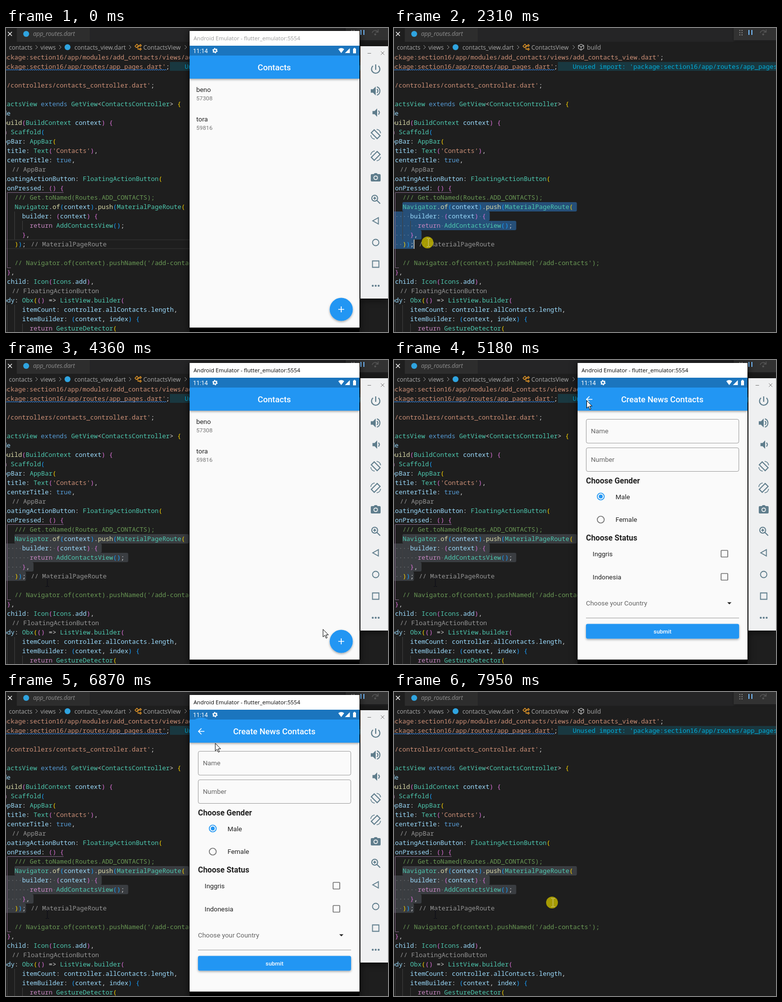
An HTML page that plays this animation: 776x618 px, repeating every 7.99 s.

```html
<!DOCTYPE html>
<html lang="en">
<head>
<meta charset="utf-8">
<title>Contacts app demo</title>
<style>
html, body { margin: 0; width: 100%; height: 100%; overflow: hidden; background: #1e1e1e; }
svg { display: block; }
text { white-space: pre; }
.code { font: 12.83px "Noto Sans Mono", monospace; }
.ui { font: 12.15px "Open Sans", sans-serif; fill: #a9a9a9; }
.app { font: 13.4px Roboto, sans-serif; fill: #000000de; }
.app .bar { font-size: 16.77px; font-weight: 500; fill: #fff; text-anchor: middle; }
.app .sub { font-size: 11.74px; fill: #0000008a; }
.app .head { font-size: 15.9px; font-weight: 700; }
.app .hint { fill: #0009; }
.line { fill: none; }
</style>
</head>
<body>
<svg id="stage" width="776" height="618" viewBox="0 0 776 618">
  <defs>
    <clipPath id="screen"><path d="M373 36H718V609H373z"/></clipPath>
    <clipPath id="status"><path d="M373 36H718V56H373z"/></clipPath>
    <filter id="soft" x="-30%" y="-30%" width="160%" height="180%">
      <feDropShadow dx="0" dy="2" stdDeviation="2" flood-opacity=".35"/>
    </filter>
    <path id="ibeam" class="line" d="M-3.5-8.5H-1L0-7.5 1-8.5H3.5M0-7.5V7.5M-3.5 8.5H-1L0 7.5 1 8.5H3.5"/>
    <g id="chev"><path class="line" stroke="#a0a0a0" d="M-2-4 2 0-2 4"/></g>
  </defs>

  <!-- editor -->
  <rect width="776" height="618" fill="#1e1e1e"/>
  <rect width="776" height="28" fill="#252526"/>
  <rect width="22" height="28" fill="#1e1e1e"/>
  <rect x="22" width="148" height="28" fill="#2d2d2d"/>
  <path d="M4 8l8 8M12 8l-8 8" stroke="#fff" stroke-width="1.3"/>
  <g fill="#2fa4e0"><circle cx="41" cy="12" r="6"/><circle cx="125" cy="39" r="6"/></g>
  <g class="ui">
    <text x="55" y="16" font-style="italic" fill="#8f8f8f">app_routes.dart</text>
    <text x="6" y="44">contacts</text>
    <text x="70" y="44">views</text>
    <text x="139" y="44">contacts_view.dart</text>
    <text x="279" y="44">ContactsView</text>
    <text x="392" y="44">build</text>
  </g>
  <use href="#chev" x="62" y="39"/><use href="#chev" x="110" y="39"/>
  <use href="#chev" x="252" y="39"/><use href="#chev" x="365" y="39"/>
  <path class="line" stroke="#ee9d28" stroke-width="1.3" d="M262 37l4-4 3 3-4 4zM268 37h3M268 37v6h3M271 35.500l2-2 2 2-2 2zM271 43l2-2 2 2-2 2z"/>
  <path class="line" stroke="#c5c5c5" stroke-width="1.1" d="M380 33l5.500 2.500v6L380 45l-5.500-3.500v-6zM374.500 35.500L380 38.500l5.500-3M380 38.500V45"/>
  <rect x="333" y="69" width="443" height="18" fill="#00b7e4" opacity=".17"/>
  <path id="current" class="line" stroke="#2d2d2d" stroke-width="1.500" d="M-2 430.500H778M-2 448.500H778"/>
  <g id="selection"></g>
  <path class="line" stroke="#404040" d="M17.500 373V430M33.500 392V411M2.500 563V618M17.500 563V618M33.500 601V618"/>
  <path class="line" stroke="#806584" d="M117 334.500H2.500V487.500H10"/>
  <g id="code" class="code"></g>
  <path id="wave" class="line" stroke="#3794ff"/>
  <rect id="caret" y="430" width="1.500" height="19" fill="#d8d8d0"/>
  <use id="trace" href="#ibeam" x="84" y="452" stroke="#090914"/>
  <g>
    <rect x="690" y="-2" width="90" height="27" fill="#333" filter="url(#soft)"/>
    <path stroke="#8a8a8a" stroke-width="2" stroke-dasharray="2 2.500" d="M702.500 4v12M707 4v12"/>
    <path stroke="#75beff" stroke-width="2" d="M721 4v10M727 4v10"/>
    <path class="line" stroke="#565656" stroke-width="1.500" d="M744 10a6 6 0 0 1 11-2M756 3v5.500h-5.500"/>
    <circle cx="750" cy="13" r="2" fill="#565656"/>
  </g>

  <!-- emulator -->
  <g id="emulator">
    <g style="filter:drop-shadow(0 1px 8px #000b)">
      <path fill="#fff" d="M373 6H718V618H373z"/><path fill="#eff0f1" d="M720 37H776V550H720z"/>
    </g>
    <text id="caption" class="ui" x="381" y="25" style="font-size:11.26px">Android Emulator - flutter_emulator:5554</text>
    <rect x="373" y="609" width="345" height="9"/>
    <g class="app" clip-path="url(#screen)">
      <rect x="373" y="36" width="345" height="573" fill="#fafafa"/>
      <rect x="373" y="36" width="345" height="67" fill="#2196f3" filter="url(#soft)"/>
      <text class="bar" x="545" y="86">Contacts</text>
      <text x="386.500" y="130">beno</text><text class="sub" x="386.500" y="147">57308</text>
      <text x="386.500" y="190">tora</text><text class="sub" x="386.500" y="207">59816</text>
      <circle cx="681" cy="572" r="23.500" fill="#2196f3" filter="url(#soft)"/>
      <circle id="tap" cx="681" cy="572" fill="#fff" opacity=".22"/>
      <path stroke="#fff" stroke-width="1.700" d="M675 572h12M681 566v12"/>

      <g id="page">
        <rect x="373" y="36" width="345" height="573" fill="#fafafa"/>
        <rect x="373" y="36" width="345" height="67" fill="#2196f3" filter="url(#soft)"/>
        <circle id="backTap" cx="397" cy="80" fill="#fff"/>
        <path class="line" stroke="#fff" stroke-width="1.600" d="M403 80H391.500M397 74l-6 6 6 6"/>
        <text class="bar" x="545" y="86">Create News Contacts</text>
        <g class="line" stroke="#00000061">
          <rect x="390.500" y="120.500" width="310" height="48.500" rx="3.400"/>
          <rect x="390.500" y="178.500" width="310" height="48" rx="3.400"/>
          <path d="M390 524.500H701"/>
        </g>
        <text class="hint" x="400" y="149">Name</text>
        <text class="hint" x="400" y="206.500">Number</text>
        <text class="head" x="390" y="250.500">Choose Gender</text>
        <text x="450" y="282.500">Male</text><text x="450" y="329">Female</text>
        <text class="head" x="390" y="367">Choose Status</text>
        <text x="403.500" y="398.500">Inggris</text><text x="403.500" y="445.500">Indonesia</text>
        <text class="hint" x="390" y="499">Choose your Country</text>
        <circle cx="420" cy="277.500" r="4" fill="#2196f3"/>
        <g class="line" stroke="#0000008a" stroke-width="1.700">
          <circle cx="420" cy="277.500" r="7" stroke="#2196f3"/>
          <circle cx="420" cy="324.500" r="7"/>
          <rect x="664.500" y="387" width="13.500" height="13.500" rx="1"/>
          <rect x="664.500" y="434" width="13.500" height="13.500" rx="1"/>
        </g>
        <path d="M677 492.500h8.500l-4.250 4.300z" fill="#222"/>
        <rect x="390" y="536.500" width="311" height="30" rx="3.400" fill="#2196f3" filter="url(#soft)"/>
        <text class="bar" x="545.500" y="555.500" style="font-size:11.74px">submit</text>
      </g>
      <rect x="373" y="36" width="345" height="20" opacity=".25"/>
      <circle id="arc" cx="397" cy="80" r="27.500" fill="#2196f3" clip-path="url(#status)"/>
      <text x="380" y="50.500" style="font-size:12px;fill:#fff">11:14</text>
      <g fill="#fff">
        <circle class="line" cx="424.500" cy="46" r="3" stroke="#fff" stroke-width="2.200"/>
        <circle class="line" cx="424.500" cy="46" r="4.600" stroke="#fff" stroke-width="1.600" stroke-dasharray="2.400 2.417"/>
        <path d="M675 43q6-4.500 12 0l-6 8zM698.500 41v10h-10zM705 42h1.500v-1.500h3V42h1.500v9.500h-6z"/>
      </g>
    </g>
    <g id="tools" fill="#5f7d8c"></g>
  </g>

  <g id="pointer">
    <circle id="press" cx="-2" r="12" fill="#b5a800" opacity=".9"/>
    <use id="beam" href="#ibeam"/>
    <path id="arrow" fill="#fff" stroke="#000" d="M.5.500v15.500l3.600-3.400 2.600 6 2.300-1-2.600-5.800h5z"/>
  </g>
</svg>
<script>
const $ = id => document.getElementById(id);
const show = (id, on) => $(id).style.display = on ? '' : 'none';
const clamp = (v, a = 0, b = 1) => Math.min(b, Math.max(a, v));
const LOOP = 7990, CHAR = 7.698, ROW = 19;

const colors = {
  s: '#ce9178', f: '#dcdcaa', t: '#4ec9b0', v: '#9cdcfe', k: '#569cd6', r: '#c586c0',
  c: '#6a9955', p: '#d4d4d4', y: '#ffd700', o: '#da70d6', u: '#179fff', g: '#969696', e: '#00aedb'
};
// [row, x, text]; "~" plus a letter switches the colour
const code = [
  [0, -75.4, "~kimport ~s'package:section16/app/modules/add_contacts/views/add_contacts_view.dart'~p;"],
  [1, -75.4, "~kimport ~s'package:section16/app/routes/app_pages.dart'~p;"],
  [1, 363, "~eUnused import: 'package:section16/app/routes/app_pages.dart'."],
  [3, -75.4, "~kimport ~s'../controllers/contacts_controller.dart'~p;"],
  [5, -75.4, "~kclass ~tContactsView ~kextends ~tGetView~p&lt;~tContactsController~p> ~y{"],
  [6, -60, "~v@override"],
  [7, -60, "~tWidget ~fbuild~o(~tBuildContext ~vcontext~o) {"],
  [8, -44.4, "~rreturn ~tScaffold~u("],
  [9, -13.4, "~vappBar~p: ~tAppBar~y("],
  [10, 2, "~vtitle~p: ~tText~o(~s'Contacts'~o)~p,"],
  [11, 2, "~vcenterTitle~p: ~ktrue~p,"],
  [12, 12, "~g// AppBar"],
  [13, -13.4, "~vfloatingActionButton~p: ~tFloatingActionButton~y("],
  [14, 2, "~vonPressed~p: ~o() {"],
  [15, 17.4, "~c/// Get.toNamed(Routes.ADD_CONTACTS);"],
  [16, 17.4, "~tNavigator~p.~fof~u(~vcontext~u)~p.~fpush~u(~tMaterialPageRoute~y("],
  [17, 32.8, "~vbuilder~p: ~o(~vcontext~o) {"],
  [18, 48.2, "~rreturn ~tAddContactsView~u()~p;"],
  [19, 32.8, "~o}~p,"],
  [20, 17.4, "~y)~u)~p;"],
  [20, 50.5, "~g// MaterialPageRoute"],
  [22, 17.4, "~c// Navigator.of(context).pushNamed('/add-contacts');"],
  [23, 2, "~o}~p,"],
  [24, 2, "~vchild~p: ~tIcon~o(~tIcons~p.~vadd~o)~p,"],
  [25, 12, "~g// FloatingActionButton"],
  [26, -13.4, "~vbody~p: ~tObx~y(~o() ~p=> ~tListView~p.~tbuilder~o("],
  [27, 32.8, "~vitemCount~p: ~vcontroller~p.~vallContacts~p.~vlength~p,"],
  [28, 32.8, "~vitemBuilder~p: ~u(~vcontext~p, ~vindex~u) {"],
  [29, 48.2, "~rreturn ~tGestureDetector~y("]
];
const span = part => `<tspan fill="${colors[part[0]]}">${part.slice(1)}</tspan>`;
$('code').innerHTML = code.map(([row, x, s]) =>
  `<text x="${x}" y="${64 + ROW * row}">${s.split('~').slice(1).map(span).join('')}</text>`).join('');
$('wave').setAttribute('d', 'M-2 86' + 'l2-2 2 2'.repeat(82));

// selected rows, with a dot for every space
const picked = code.filter(([row, , s]) => row > 15 && row < 21 && s[1] != 'g').map(([row, x, s], i) => {
  const text = s.replace(/~./g, ''), pad = [0, 2, 4, 2, 0][i] + (i ? 2 : 0);
  const dots = (' '.repeat(pad) + text).replace(/[^ ]/g, '_').replace(/ /g, '·').replace(/_/g, ' ');
  return { row, x, dots, from: i ? -4 : 17, to: x + text.length * CHAR, dotX: x - pad * CHAR };
});
$('selection').innerHTML = picked.map(p =>
  `<g><rect x="${p.from}" y="${50 + ROW * p.row}" height="${ROW}" rx="3"/>
   <text class="code" x="${p.dotX}" y="${64 + ROW * p.row}" fill="#ffffff48">${p.dots}</text></g>`).join('');
const bands = [...$('selection').children];

// side tools
const stroke = (d, w = 1.8) => `<path d="${d}" class="line" stroke="#5f7d8c" stroke-width="${w}"/>`;
const rotate = stroke('M-3-9 9 3 3 9-9-3z', 2) + stroke('M2-10q7 1 8 8M-2 10q-7-1-8-8', 1.5);
const speaker = 'M-10-3.500v7h4.500l5.500 5.500V-9L-5.500-3.500z';
const tools = [
  stroke('M0-10V1M5.500-7a8.500 8.500 0 1 1-11 0', 2.2),
  `<path d="${speaker}"/>` + stroke('M2.500-4q4 4 0 8M2.500-8.500a9 9 0 0 1 0 17', 2),
  `<path transform="translate(3)scale(.95)" d="${speaker}"/>` + stroke('M5.500-4q4 4 0 8', 2),
  rotate,
  `<g transform="scale(-1 1)">${rotate}</g>`,
  '<path d="M-8-7h4l2-2h4l2 2h4q2 0 2 2V6q0 2-2 2H-8q-2 0-2-2V-5q0-2 2-2z"/><circle r="4.500" cy=".5" fill="#eff0f1"/><circle r="2.800" cy=".5"/>',
  stroke('M4-2a6 6 0 1 1-12 0 6 6 0 1 1 12 0M2.500 2.500 9 9M-5-2h6M-2-5v6', 2),
  stroke('M5.500-6.500v13L-6 0z'),
  '<circle r="6.500" class="line" stroke="#5f7d8c" stroke-width="1.800"/>',
  stroke('M-6.500-6.500h13v13h-13z'),
  '<circle cx="-6" r="2"/><circle r="2"/><circle cx="6" r="2"/>'
];
$('tools').innerHTML = tools.map((t, i) => `<g transform="translate(751 ${84 + 44 * i})">${t}</g>`).join('')
  + '<path class="line" stroke="#777" d="M734.500 51.500h7M761.500 47.500l7 7M768.500 47.500l-7 7"/>';

// pointer path: [ms, x, y]
const path = [
  [530, 735, 570], [800, 500, 385], [1000, 250, 296], [1320, 66, 380], [1350, 66, 380], [1580, 12, 366],
  [1840, 12, 366], [2310, 70, 436], [2560, 70, 437], [2680, 157, 498], [3719, 157, 498],
  [3720, 419, 598], [4000, 520, 466], [4450, 674, 567], [4850, 674, 567], [5180, 391, 82],
  [5560, 391, 82], [5820, 635, 466], [6000, 674, 567], [6580, 674, 567], [6870, 425, 104],
  [6970, 391, 82], [7260, 391, 82], [7760, 323, 428], [7990, 323, 428]
];
function pointerAt(t) {
  const i = path.findIndex(p => p[0] > t);
  if (i < 1) return path[0].slice(1);
  const [t0, x0, y0] = path[i - 1], [t1, x1, y1] = path[i], k = (t - t0) / (t1 - t0);
  return [x0 + (x1 - x0) * k, y0 + (y1 - y0) * k];
}

function bezier(x1, y1, x2, y2) {
  const at = (a, b, s) => 3 * a * s * (1 - s) ** 2 + 3 * b * s * s * (1 - s) + s ** 3;
  return x => {
    let lo = 0, hi = 1;
    for (let i = 0; i < 18; i++) {
      const mid = (lo + hi) / 2;
      if (at(x1, x2, mid) < x) lo = mid; else hi = mid;
    }
    return at(y1, y2, lo);
  };
}
const slideEase = bezier(.4, 0, .2, 1), fadeEase = bezier(.42, 0, 1, 1);

function draw(t) {
  const step = start => clamp((t - start) / 300);
  const [x, y] = pointerAt(t);
  const emulator = t < 1870 || (t >= 3470 && t < 7860);
  const focused = t >= 3510 && t < 7860;

  // selection and caret
  const selecting = t >= 1840;
  const last = t < 2400 ? clamp(Math.floor((y - 354) / ROW), 0, 4) : 4;
  let caretX = 17;
  bands.forEach((band, i) => {
    const p = picked[i];
    const end = i < last ? p.to + CHAR : t < 2400 ? clamp(x, 17, p.to) : p.to;
    band.style.display = selecting && i <= last ? '' : 'none';
    band.firstChild.setAttribute('width', end - p.from);
    if (i == last) caretX = end;
  });
  $('selection').setAttribute('fill', t < 3510 ? '#264f78' : '#3a3d41');
  show('current', !selecting);
  show('caret', selecting && t < 3510 && !(t >= 2680 && t < 3190));
  $('caret').setAttribute('x', caretX - .5);
  $('caret').setAttribute('y', 354 + ROW * last);
  show('trace', t > 2590);

  // emulator
  show('emulator', emulator);
  $('caption').style.fill = focused ? '#000' : '#999';
  const open = step(4620) - step(5570) + step(6320) - step(7150);
  show('page', open > 0);
  $('page').setAttribute('transform', `translate(0 ${143 * (1 - slideEase(open))})`);
  $('page').setAttribute('opacity', fadeEase(open));
  const fab = t < 6000 ? t - 4520 : t - 6210;
  $('tap').setAttribute('r', fab > 0 && fab < 400 ? 23.5 * clamp(fab / 220) : 0);
  const back = t < 6900 ? t - 5400 : t - 7010;
  $('backTap').setAttribute('r', 27.5 * clamp(back / 180));
  $('backTap').setAttribute('opacity', back > 0 ? .2 * clamp(1.6 - back / 250) : 0);
  show('arc', t > 5480);

  // pointer
  const pressed = (t >= 1840 && t < 2400) || t >= 7820;
  const arrow = emulator && x >= 373 && (x < 718 || y < 550);
  show('pointer', t >= 530 && !(t >= 2680 && t < 3720));
  $('pointer').setAttribute('transform', `translate(${x} ${y})`);
  show('press', pressed);
  show('arrow', arrow);
  show('beam', !arrow);
  $('beam').setAttribute('stroke', pressed ? '#d8d090' : '#090914');
}
function tick(now) {
  draw(now % LOOP);
  requestAnimationFrame(tick);
}
requestAnimationFrame(tick);
</script>
</body>
</html>
```
